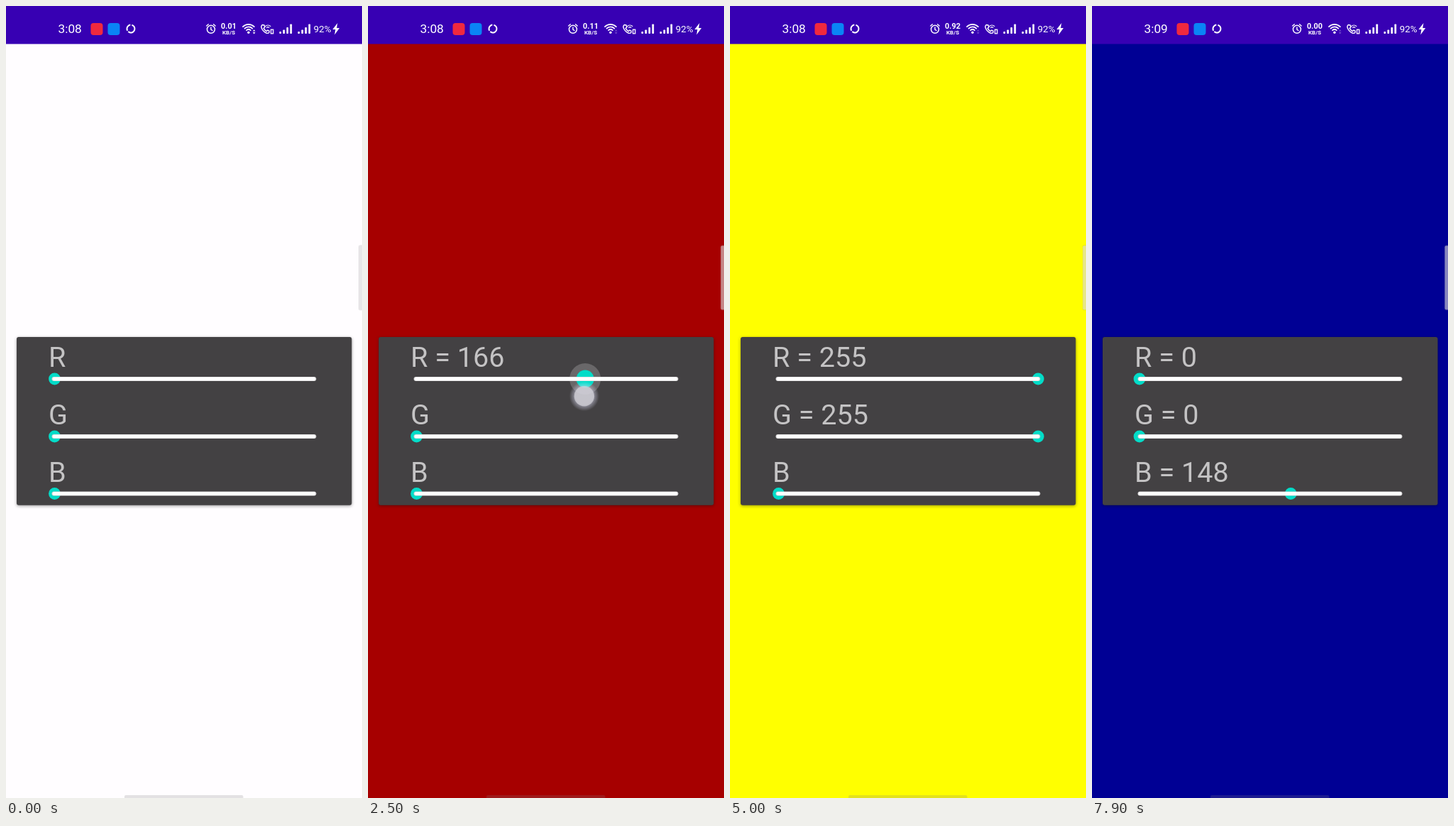
An HTML page with a canvas for the animation above (8000 ms loop, 502x1115 px).

```html
<!DOCTYPE html>
<html lang="en">
<head>
<meta charset="utf-8">
<title>RGB sliders</title>
<style>
html, body { margin: 0; width: 502px; height: 1115px; overflow: hidden; }
canvas { display: block; }
</style>
</head>
<body>
<canvas id="stage" width="502" height="1115"></canvas>
<script>
const ctx = document.getElementById('stage').getContext('2d');
const LOOP = 8000, STEP = 100, FADE = 200;
const NAMES = ['R', 'G', 'B'];
const TRACK_Y = [525, 606, 686.5];

// One entry per finger drag: slider, release time, finger offset below the track, [time, value] keys
const DRAGS = [
  { slider: 0, up: 2600, dy: [18, 25], keys: [[1600, 30], [1900, 125], [2200, 172], [2500, 166], [2600, 164]] },
  { slider: 1, up: 3200, dy: [14, 22], keys: [[2700, 15], [2900, 110], [3200, 255]] },
  { slider: 0, up: 4600, dy: [16, 22], keys: [[3600, 164], [4000, 200], [4500, 255]] },
  { slider: 1, up: 5500, dy: [12, 4], keys: [[5200, 255], [5500, 0]] },
  { slider: 0, up: 6200, dy: [-32, -32], keys: [[5600, 240], [5900, 7], [6000, 0]] },
  { slider: 2, up: 7600, dy: [14, 20], keys: [[6800, 10], [7200, 110], [7500, 148]] }
];
const SPEED = [[0, '0.01'], [1200, '0.11'], [2900, '0.92'], [5200, '0.00']];

const mix = (a, b, k) => a + (b - a) * k;
const clamp = k => Math.max(0, Math.min(1, k));
const thumbX = v => 67 + v * 1.441;
const start = d => d.keys[0][0];

function valueAt(keys, t) {
  if (t <= keys[0][0]) return keys[0][1];
  for (let i = 1; i < keys.length; i++) {
    const [t0, v0] = keys[i - 1], [t1, v1] = keys[i];
    if (t <= t1) return mix(v0, v1, (t - t0) / (t1 - t0));
  }
  return keys[keys.length - 1][1];
}

function box(x, y, w, h, r, color) {
  ctx.fillStyle = color;
  ctx.beginPath();
  ctx.roundRect(x, y, w, h, r);
  ctx.fill();
}

function disc(x, y, r, color) {
  ctx.fillStyle = color;
  ctx.beginPath();
  ctx.arc(x, y, r, 0, 7);
  ctx.fill();
}

function arc(x, y, r, from, to, width) {
  ctx.lineWidth = width;
  ctx.beginPath();
  ctx.arc(x, y, r, from, to);
  ctx.stroke();
}

function line(d, width) {
  ctx.lineWidth = width;
  ctx.stroke(new Path2D(d));
}

function text(s, x, y, font, color, align = 'left') {
  ctx.font = font + ' Roboto, sans-serif';
  ctx.fillStyle = color;
  ctx.textAlign = align;
  ctx.fillText(s, x, y);
}

function wifi(x, y, radii, width) {
  for (const r of radii) arc(x, y, r, -2.36, -0.78, width);
}

function statusBar(t) {
  box(0, 0, 502, 53.5, 0, '#3700b3');
  text(t < 5200 ? '3:08' : '3:09', 73.5, 38, '17.3px', '#fff');
  box(119.5, 24, 17, 17, 4, '#f0293e');
  box(143.5, 24, 17, 17, 4, '#0a84f5');
  ctx.strokeStyle = '#fff';
  ctx.lineCap = 'butt';
  arc(176, 32, 5.5, -1.3, 2.3, 2);
  arc(176, 32, 5.5, 2.6, 4.6, 2);

  ctx.lineCap = 'round';
  arc(289, 32.8, 5.5, 0, 7, 1.5);
  line('M289 30v3.2l2 1.3M282.8 28l2.6-2.3M295.2 28l-2.6-2.3', 1.4);

  const speed = SPEED.filter(s => s[0] <= t).pop()[1];
  text(speed, 314, 32, 'bold 11px', '#fff', 'center');
  text('KB/S', 314, 40.3, 'bold 8px', '#fff', 'center');

  wifi(342, 37, [4, 7.6, 11.2], 1.8);
  disc(342, 37.3, 1.7, '#fff');
  const busy = t < 1400 || (t >= 2900 && t < 5000);
  ctx.fillStyle = busy ? '#fff' : 'rgba(255,255,255,.3)';
  ctx.fill(new Path2D('M348 35.6l1.8-2.4 1.8 2.4zM348 37l1.8 2.4 1.8-2.4z'));

  line('M361.5 26.5l2.5.3 1 3-1.7 1.6q1.3 2.8 4 4.2l1.7-1.5 2.2 1-.2 2.5q-1.4 1.4-4 .4-5-2.2-6.8-7.4-.7-3 1.3-4.1z', 1.4);
  wifi(369.3, 32, [2.3, 5], 1.2);
  ctx.lineCap = 'butt';
  ctx.lineWidth = 1.3;
  ctx.strokeRect(373.6, 33.2, 3.2, 5.6);

  for (const x of [385.5, 411.5])
    [3, 5.5, 9, 13.5].forEach((h, i) => box(x + i * 5, 39 - h, 2.7, h, 0.8, '#fff'));
  text('92%', 433.8, 37, '13.4px', '#fff');
  ctx.fillStyle = '#fff';
  ctx.fill(new Path2D('M467.5 24l-7 9h4l-1.2 7.5 7-9.5h-4z'));
}

function card() {
  ctx.save();
  ctx.shadowColor = 'rgba(0,0,0,.38)';
  ctx.shadowBlur = 4;
  ctx.shadowOffsetY = 1.2;
  box(15, 466, 472.5, 236.8, 3, '#434143');
  ctx.restore();
}

function slider(i, value, press) {
  const y = TRACK_Y[i], x = value === null ? 68.5 : thumbX(value);
  const label = value === null ? NAMES[i] : `${NAMES[i]} = ${value}`;
  text(label, 60, y - 17, '39.6px', '#c4c3c4');
  if (press) disc(x, y, mix(14, 22, press), `rgba(255,255,255,${0.2 * press})`);
  disc(x, y, mix(8.4, 12.5, press), '#03dcc8');
  box(64.5, y - 3, 373, 6, 3, '#d0ced0');
  box(65.5, y - 2.5, 371, 5, 2.5, '#fff');
}

function finger(drag, t) {
  const k = clamp((t - start(drag)) / (drag.up - start(drag)));
  // The slider lags slightly behind the finger
  const x = thumbX(valueAt(drag.keys, t + 45));
  const y = TRACK_Y[drag.slider] + mix(...drag.dy, k);
  const glow = ctx.createRadialGradient(x, y, 12, x, y, 21);
  glow.addColorStop(0, 'rgba(225,225,250,.55)');
  glow.addColorStop(1, 'rgba(225,225,250,0)');
  disc(x, y, 21, glow);
  disc(x, y, 14.2, 'rgba(212,210,216,.72)');
}

function draw(t) {
  const values = [null, null, null], press = [0, 0, 0];
  let held = null;
  for (const d of DRAGS) {
    if (t < start(d)) continue;
    values[d.slider] = Math.round(valueAt(d.keys, t));
    press[d.slider] = t < d.up ? clamp((t - start(d) + 100) / 200) : clamp(1 - (t - d.up) / FADE);
    if (t < d.up) held = d;
  }
  const back = t < start(DRAGS[0]) ? '#fffdff' : `rgb(${values.map(v => v || 0)})`;
  box(0, 0, 502, 1115, 0, back);
  statusBar(t);
  box(497, 336.5, 8, 92, 2.5, 'rgba(150,150,150,.22)');
  box(497.5, 337.5, 8, 90, 2, 'rgba(230,228,230,.52)');
  box(167, 1111, 167.5, 6, 2, 'rgba(128,125,128,.22)');
  card();
  NAMES.forEach((_, i) => slider(i, values[i], press[i]));
  if (held) finger(held, t);
}

const begin = performance.now();
function tick() {
  const t = (performance.now() - begin) % LOOP;
  draw(Math.floor(t / STEP) * STEP);
  requestAnimationFrame(tick);
}
tick();
</script>
</body>
</html>
```
